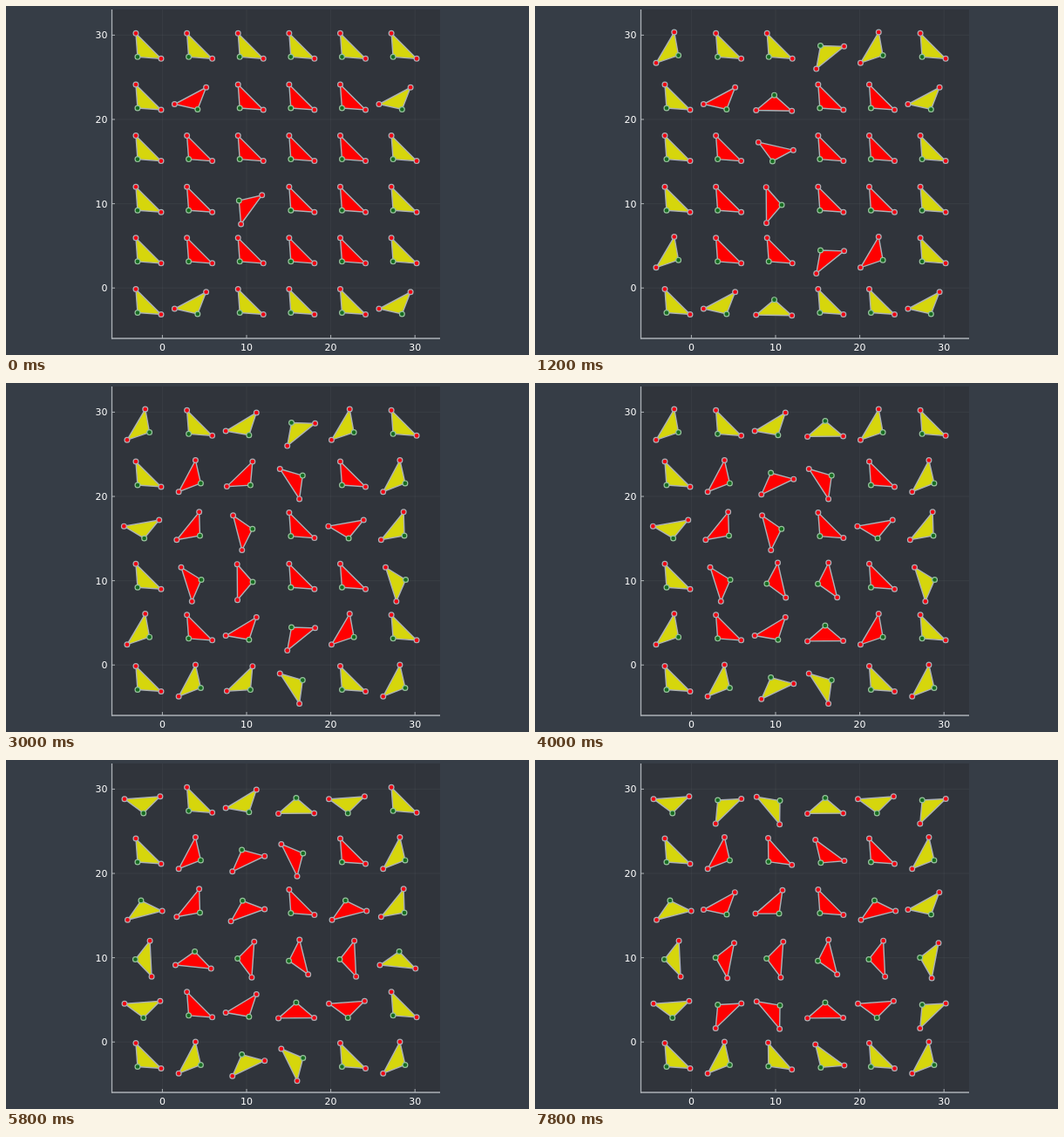
Animation of 600 by 400 pixels, one loop 8000 ms. Source, as an HTML page with a canvas:

```html
<!DOCTYPE html>
<html>
<head>
<meta charset="utf-8">
<style>
  html, body { margin: 0; width: 100%; height: 100%; overflow: hidden; background: #363d46; }
  canvas { display: block; }
</style>
</head>
<body>
<canvas id="stage" width="600" height="400"></canvas>
<script>
const ctx = document.getElementById('stage').getContext('2d');
const LOOP = 8000, STEP = 200, FOREGROUND = '#adb2b7';
const SPACING = 58.63, ORIGIN_X = 157.1, ORIGIN_Y = 52.2;
const START_ANGLE = 135;

// Each move is [row and column of a cell, new angle in degrees].
const startMoves = [[11, 62], [32, -144]];
const moves = [
  [44, 66], [12, -89], [22, 102.7], [32, -0.5], [43, -129], [44, 30.5],
  [11, 28], [12, 46], [13, -102.7], [31, -17.5], [21, 39], [22, -14.4],
  [13, -33], [24, 80], [42, 59], [43, -90.5], [32, 167], [33, 150],
  [33, 166], [12, -115.5], [31, -60], [44, 85.8], [24, -104.4], [22, -109.7],
  [32, 176], [34, 177.2], [31, -84.3], [13, -26.3], [32, 184], [41, 124],
  [12, 138.5], [41, -134], [13, 126], [22, 90], [22, 49], [31, 114],
  [42, -40], [21, 61], [31, 191]
];

// The 4 x 4 block repeats periodically into the border cells.
const wrap = i => (i + 3) % 4 + 1;
const isInner = i => i >= 1 && i <= 4;

function line(x1, y1, x2, y2, width, color) {
  ctx.beginPath();
  ctx.moveTo(x1, y1);
  ctx.lineTo(x2, y2);
  ctx.lineWidth = width;
  ctx.strokeStyle = color;
  ctx.stroke();
}

function dot([x, y], fill, stroke) {
  ctx.beginPath();
  ctx.arc(x, y, 2.9, 0, 2 * Math.PI);
  ctx.fillStyle = fill;
  ctx.fill();
  ctx.lineWidth = 1.2;
  ctx.strokeStyle = stroke;
  ctx.stroke();
}

function drawAxes() {
  ctx.fillStyle = '#363d46';
  ctx.fillRect(0, 0, 600, 400);
  ctx.fillStyle = '#30343b';
  ctx.fillRect(121.5, 4, 376.5, 377);
  ctx.font = '11px "DejaVu Sans", sans-serif';
  ctx.textBaseline = 'alphabetic';
  for (let i = 0; i < 4; i++) {
    const x = 179.4 + 96.6 * i, y = 323.2 - 96.6 * i;
    line(x, 4, x, 381, 0.7, 'rgba(173,178,183,0.1)');
    line(121, y, 498, y, 0.7, 'rgba(173,178,183,0.1)');
    line(x, 381, x, 377, 1, FOREGROUND);
    line(121, y, 125, y, 1, FOREGROUND);
    ctx.fillStyle = '#fff';
    ctx.textAlign = 'center';
    ctx.fillText(i * 10, x, 395);
    ctx.textAlign = 'right';
    ctx.fillText(i * 10, 116.5, y + 4);
  }
  line(121.5, 4, 121.5, 381.5, 1.3, FOREGROUND);
  line(121, 381, 498, 381, 1.3, FOREGROUND);
}

function drawTriangle(row, col, degrees) {
  const angle = degrees * Math.PI / 180, c = Math.cos(angle), s = Math.sin(angle);
  const place = (u, v) => [
    ORIGIN_X + SPACING * col + u * c - v * s,
    ORIGIN_Y + SPACING * row + u * s + v * c
  ];
  const apex = place(8.7, 0), left = place(-9, -20.5), right = place(-9, 20.5);
  ctx.beginPath();
  [apex, left, right].forEach(p => ctx.lineTo(...p));
  ctx.closePath();
  ctx.fillStyle = isInner(row) && isInner(col) ? '#f00' : '#d6d60c';
  ctx.fill();
  ctx.lineWidth = 1.4;
  ctx.strokeStyle = FOREGROUND;
  ctx.stroke();
  dot(left, '#f00012', FOREGROUND);
  dot(right, '#f00012', FOREGROUND);
  dot(apex, '#176b22', '#98c29e');
}

function draw() {
  const count = Math.floor(performance.now() % LOOP / STEP);
  const angles = Object.fromEntries([...startMoves, ...moves.slice(0, count)]);
  drawAxes();
  for (let row = 0; row < 6; row++)
    for (let col = 0; col < 6; col++)
      drawTriangle(row, col, angles[wrap(row) * 10 + wrap(col)] ?? START_ANGLE);
  requestAnimationFrame(draw);
}
draw();
</script>
</body>
</html>
```
